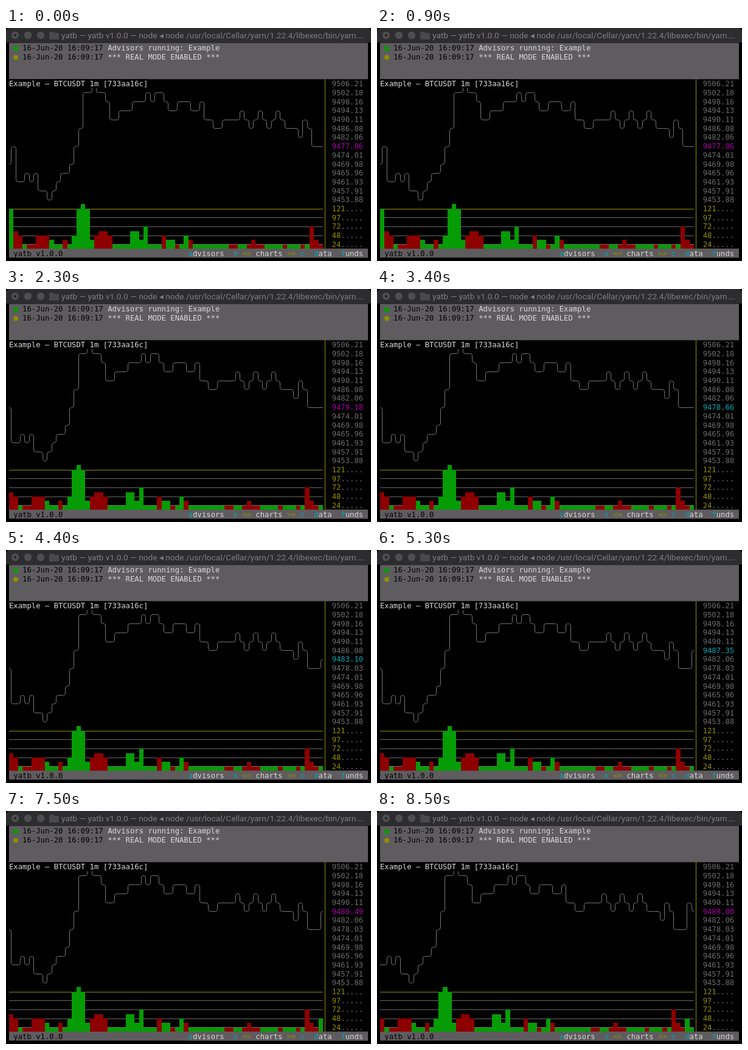
Write an HTML page with a canvas that moves like this. It is 600 px wide and 384 px high and loops after 8800 ms.

```html
<!DOCTYPE html>
<html lang="en">
<head>
<meta charset="utf-8">
<title>Trading terminal</title>
<style>
html, body { margin: 0; width: 100%; height: 100%; overflow: hidden; background: #000; }
canvas { display: block; width: 600px; height: 384px; }
</style>
</head>
<body>
<canvas id="stage" width="600" height="384"></canvas>
<script>
const ctx = document.getElementById('stage').getContext('2d');
const LOOP = 8800;

// Terminal grid
const CW = 7.37, CH = 14.7, LEFT = 5, TOP = 25.6, COLS = 70;
const colX = c => LEFT + c * CW;
const rowY = r => TOP + r * CH;
const lineX = c => Math.floor(colX(c + 0.5)) + 0.5;
const lineY = r => Math.round(rowY(r + 0.5)) + 0.5;

// Price axis
const AXIS_ROW = 4, AXIS_TOP = 9506.21, AXIS_STEP = 52.33 / 13;

const C = {
  grey: '#5f5c5f', line: '#757575', label: '#6b6b6b', white: '#d8d8d8', black: '#000000',
  red: '#8e0000', green: '#059c05', yellow: '#8f8f00', magenta: '#a800a8', cyan: '#00a6b2'
};
const MONO = '12.24px "DejaVu Sans Mono", monospace';
const SANS = '13.7px Roboto, sans-serif';

// Turning points of the chart: [candle, row]
const TREND = [
  [0, 13], [1, 11], [2, 15], [7, 15.7], [9, 16.6], [14, 12.9], [16, 9], [17, 5], [19, 4],
  [22, 5.6], [23, 8], [30, 5.6], [31, 5], [32, 6], [33, 4.6], [36, 7], [39, 5.6], [42, 7],
  [43, 6], [44, 8], [46, 8.9], [51, 7.6], [52, 9], [64, 9], [65, 10], [66, 7.6], [68, 11]
];

// Bursts of volume over a low random floor
const BURSTS = [
  { at: 0, height: 9, width: 0.5, up: true },
  { at: 1.2, height: 4, width: 1.2 },
  { at: 7, height: 3, width: 1.6 },
  { at: 15.95, height: 10, width: 1.8, up: true },
  { at: 20.5, height: 4, width: 2.2 },
  { at: 27.5, height: 4, width: 1, up: true },
  { at: 30, height: 5, width: 0.6, up: true },
  { at: 34, height: 3, width: 0.6 },
  { at: 39, height: 3, width: 0.6, up: true },
  { at: 67.3, height: 5, width: 0.7 }
];

// Ticks: [time, price]
const TICKS = [
  [0, 9477.86], [1100, 9479.52], [1400, 9479.18], [2500, 9478.40], [3400, 9478.66],
  [4400, 9483.10], [5100, 9487.35], [6100, 9488.69], [6800, 9489.86], [7500, 9489.49], [8200, 9489.00]
];

function box(x, y, w, h, color) {
  ctx.fillStyle = color;
  ctx.fillRect(x, y, w, h);
}

function disc(x, y, r, color) {
  ctx.fillStyle = color;
  ctx.beginPath();
  ctx.arc(x, y, r, 0, Math.PI * 2);
  ctx.fill();
}

function text(s, col, row, color) {
  ctx.font = MONO;
  ctx.fillStyle = color;
  ctx.fillText(s, colX(col), rowY(row + 0.5) + 4.5);
}

function random(seed) {
  const n = Math.sin(seed * 12.9898) * 43758.5453;
  return n - Math.floor(n);
}

function trendAt(i) {
  const k = TREND.findIndex(p => p[0] > i);
  if (k < 0) return TREND.at(-1)[1];
  const [x0, y0] = TREND[k - 1], [x1, y1] = TREND[k];
  return y0 + (y1 - y0) * (i - x0) / (x1 - x0);
}

// Periodic upward ripple between two candles
function ripple(i, from, to, period, height) {
  if (i < from || i > to) return 0;
  return height * (1 + Math.cos((i - from) / period * 2 * Math.PI)) / 2;
}

function levelAt(i) {
  return Math.round(trendAt(i) - ripple(i, 4, 6, 2, 1.2) - ripple(i, 52, 61, 4, 2));
}

function candleVolume(i) {
  const floor = random(i + 1) > 0.85 ? 2 : 1;
  let bar = { height: floor, up: random(i + 40) < 0.6 };
  for (const { at, height, width, up } of BURSTS) {
    const h = Math.round(height * Math.exp(-(((i - at) / width) ** 4)));
    if (h > bar.height) bar = { height: h, up };
  }
  return bar;
}

function drawTitleBar() {
  ctx.fillStyle = '#2d2c2e';
  ctx.beginPath();
  ctx.roundRect(0, 0, 600, 40, 6);
  ctx.fill();
  box(0, 24, 600, 360, C.black);
  for (const x of [15, 36, 57]) disc(x, 12, 6.2, '#4e4d4f');
  disc(15, 12, 2, '#1f1e20');
  ctx.fillStyle = '#48494c';
  ctx.beginPath();
  ctx.roundRect(71, 6, 8, 5, 1.5);
  ctx.roundRect(71, 8, 16, 11, 1.5);
  ctx.fill();
  ctx.font = SANS;
  ctx.fillStyle = '#7f7e80';
  ctx.fillText('yatb — yatb v1.0.0 — node ◂ node /usr/local/Cellar/yarn/1.22.4/libexec/bin/yarn.…', 91, 17);
}

function drawHeader() {
  box(LEFT, 24.5, 590, rowY(4) - 24.5, C.grey);
  const logs = [[C.green, 'Advisors running: Example'], [C.yellow, '*** REAL MODE ENABLED ***']];
  logs.forEach(([color, message], row) => {
    disc(colX(1.5), rowY(row + 0.5) + 0.8, 4, color);
    text('16-Jun-20 16:09:17', 3, row, C.black);
    text(message, 22, row, C.white);
  });
}

function drawFooter() {
  box(LEFT, rowY(23), 590, CH, C.grey);
  text('yatb v1.0.0', 1, 23, C.black);
  text('advisors      charts       data  funds', 40, 23, C.white);
  box(colX(40), rowY(23), 40 * CW, CH, C.grey);
  const menu = (s, col, hot = 1) => {
    text(s.slice(0, hot), col, 23, C.cyan);
    text(s.slice(hot), col + hot, 23, C.white);
  };
  menu('advisors', 40);
  menu('x', 50);
  text('<<', 52, 23, C.yellow);
  menu('charts', 55, 0);
  text('>>', 62, 23, C.yellow);
  menu('c', 65);
  menu('data', 68);
  menu('funds', 74);
}

function drawPrice(shift, row) {
  const level = c => c === COLS ? row : c + shift === 71 ? 8 : levelAt(c + shift);
  ctx.strokeStyle = C.line;
  ctx.lineWidth = 1;
  ctx.beginPath();
  ctx.moveTo(LEFT, lineY(level(0)));
  for (let c = 0; c < COLS; c++) {
    const x = lineX(c), y0 = lineY(level(c)), y1 = lineY(level(c + 1));
    if (y0 !== y1) {
      ctx.arcTo(x, y0, x, y1, 3.4);
      ctx.arcTo(x, y1, x + CW / 2, y1, 3.4);
    }
    ctx.lineTo(colX(c + 1), y1);
  }
  ctx.stroke();
}

function drawVolume(shift, liveHeight) {
  for (let row = 18; row < 23; row++) {
    box(LEFT, lineY(row) - 0.5, COLS * CW, 1, row === 18 ? C.yellow : '#686868');
  }
  const bottom = Math.round(rowY(23));
  for (let c = 0; c < COLS; c++) {
    const i = c + shift;
    const { height, up } = i < COLS ? candleVolume(i) : { height: i === COLS ? liveHeight : 1, up: true };
    const h = Math.round(height * CH / 2);
    const x = Math.round(colX(c));
    box(x, bottom - h, Math.round(colX(c + 1)) - x, h, up ? C.green : C.red);
  }
}

function drawAxis(row, price, rising) {
  box(lineX(COLS) - 0.5, rowY(4), 1, 19 * CH, C.yellow);
  for (let r = AXIS_ROW; r < 18; r++) {
    const current = r === row;
    const value = current ? price : AXIS_TOP - (r - AXIS_ROW) * AXIS_STEP;
    text(value.toFixed(2), 72, r, !current ? C.label : rising ? C.cyan : C.magenta);
  }
  for (let i = 0; i < 5; i++) {
    const label = String(Math.floor(121.5 * (5 - i) / 5));
    text(label, 72, 18 + i, C.yellow);
    text('.'.repeat(7 - label.length), 72 + label.length, 18 + i, C.label);
  }
}

function draw(t) {
  const tick = TICKS.findLastIndex(p => p[0] <= t);
  const price = TICKS[tick][1];
  const rising = price > TICKS.at(tick - 1)[1];
  const row = Math.ceil(AXIS_ROW + (AXIS_TOP - price) / AXIS_STEP - 0.05);
  const shift = (t >= 2000) + (t >= 7800);
  const liveHeight = 1 + (t >= 5700) + (t >= 6100);

  box(0, 0, 600, 384, C.black);
  drawTitleBar();
  drawHeader();
  drawPrice(shift, row);
  drawVolume(shift, liveHeight);
  drawAxis(row, price, rising);
  const title = 'Example – BTCUSDT 1m [733aa16c]';
  box(LEFT, rowY(4), title.length * CW, CH, C.black);
  text(title, 0, 4, C.white);
  drawFooter();
}

function play() {
  draw(performance.now() % LOOP);
  requestAnimationFrame(play);
}
play();
</script>
</body>
</html>
```
